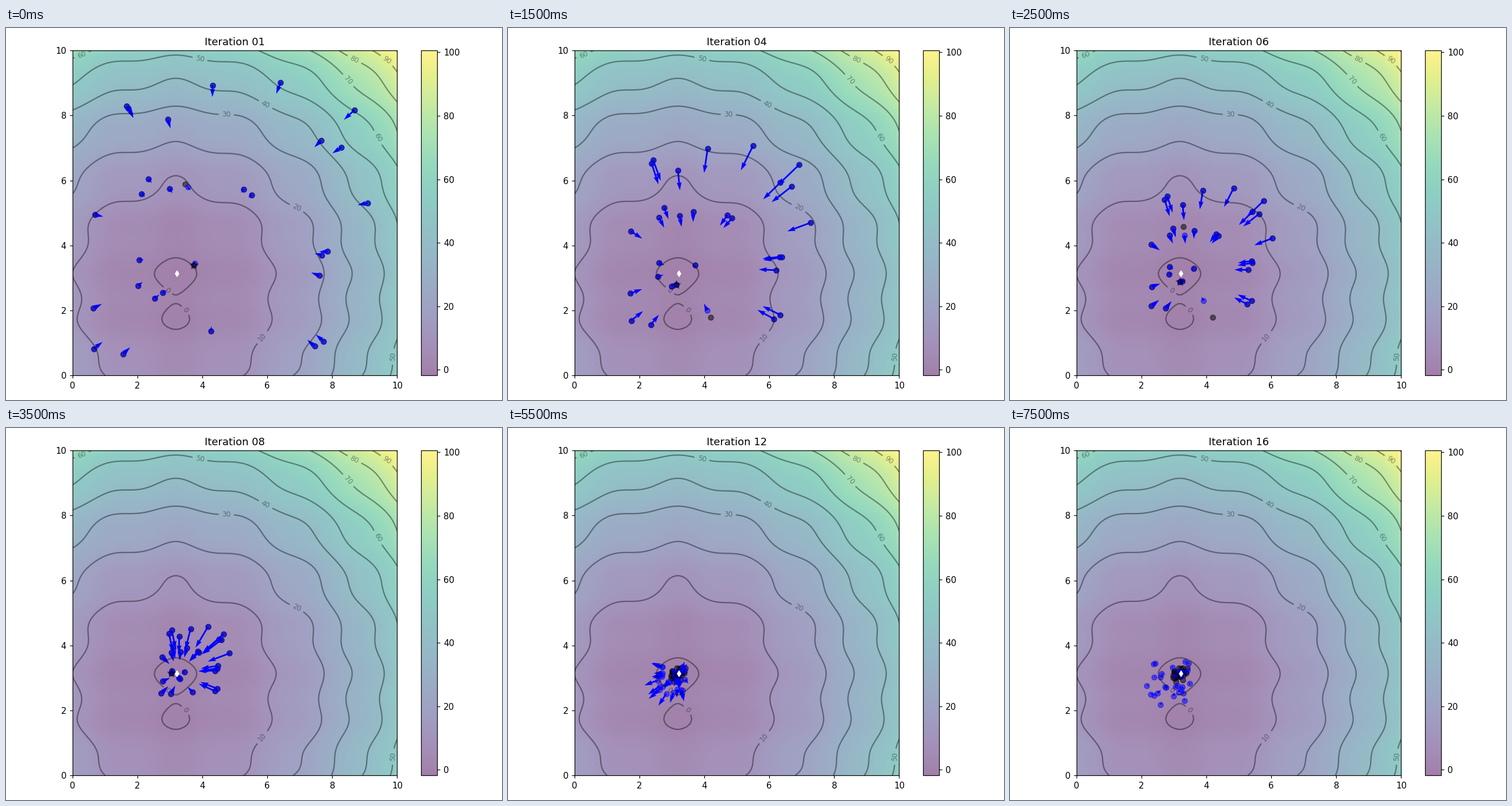
Animation, 864 px wide and 648 px high, one loop 8000 ms. Source, as a matplotlib script:

```python
import numpy as np
import matplotlib.pyplot as plt
from matplotlib.animation import FuncAnimation

SIZE = 10
PARTICLES = 30
STEPS = 16
WARMUP = 1
W, C1, C2 = 0.8, 0.1, 0.1

# where the contour labels sit, in data coordinates
LABELS = [(2.94, 2.61), (3.51, 2.03), (5.84, 1.18), (6.91, 5.17), (4.74, 8.05),
          (5.96, 8.36), (3.93, 9.76), (9.85, 0.58), (0.28, 9.89), (9.43, 7.33),
          (8.51, 9.10), (8.69, 9.74), (9.70, 9.72)]


def f(x, y):
    return (x - 3.14)**2 + (y - 2.72)**2 + np.sin(3*x + 1.41) + np.sin(4*y - 1.73)


def swarm(n_updates):
    """Run the particle swarm and return (X, V, pbest, gbest) after each update."""
    rng = np.random.RandomState(100)
    X = rng.rand(2, PARTICLES) * SIZE
    V = rng.rand(2, PARTICLES) * 0.1
    pbest, pbest_obj = X.copy(), f(*X)
    gbest = pbest[:, pbest_obj.argmin()].copy()
    history = []
    for _ in range(n_updates):
        r1, r2 = rng.rand(2)
        V = W*V + C1*r1*(pbest - X) + C2*r2*(gbest.reshape(-1, 1) - X)
        X = X + V
        obj = f(*X)
        better = pbest_obj >= obj
        pbest = np.where(better, X, pbest)
        pbest_obj = np.minimum(pbest_obj, obj)
        gbest = pbest[:, pbest_obj.argmin()].copy()
        history.append((X, V, pbest, gbest))
    return history


states = swarm(STEPS + WARMUP)[WARMUP:]

axis = np.linspace(0, SIZE, 100)
x, y = np.meshgrid(axis, axis)
z = f(x, y)
x_min, y_min = x.ravel()[z.argmin()], y.ravel()[z.argmin()]

fig, ax = plt.subplots(figsize=(8, 6), dpi=108)
img = ax.imshow(z, extent=[0, SIZE, 0, SIZE], origin="lower", cmap="viridis", alpha=0.5)
fig.colorbar(img, ax=ax)
ax.plot([x_min], [y_min], marker="d", markersize=5, color="white")
contours = ax.contour(x, y, z, 10, colors="black", alpha=0.4)
ax.clabel(contours, inline=True, fontsize=8, fmt="%.0f", manual=LABELS)

X, V, pbest, gbest = states[0]
pbest_plot = ax.scatter(*pbest, marker="o", color="black", alpha=0.5)
p_plot = ax.scatter(*X, marker="o", color="blue", alpha=0.5)
p_arrow = ax.quiver(*X, *V, color="blue", width=0.005,
                    angles="xy", scale_units="xy", scale=1)
gbest_plot = ax.scatter(*gbest, marker="*", s=100, color="black", alpha=0.4)
ax.set_xlim(0, SIZE)
ax.set_ylim(0, SIZE)
ax.set_title("Iteration 01")

# margins in inches on the 8 x 6 figure
fig.subplots_adjust(left=0.15/8, right=1 - 0.15/8, bottom=0.397/6, top=1 - 0.363/6)


def animate(i):
    X, V, pbest, gbest = states[i]
    ax.set_title(f"Iteration {i + 1:02d}")
    pbest_plot.set_offsets(pbest.T)
    p_plot.set_offsets(X.T)
    # "xy" angles are computed from XY, so keep it in step with the offsets
    p_arrow.set_offsets(X.T)
    p_arrow.XY = X.T
    p_arrow.set_UVC(*V)
    gbest_plot.set_offsets(gbest.reshape(1, -1))
    return ax.title, pbest_plot, p_plot, p_arrow, gbest_plot


anim = FuncAnimation(fig, animate, frames=STEPS, interval=500, repeat=True, blit=False)
plt.show()
```
